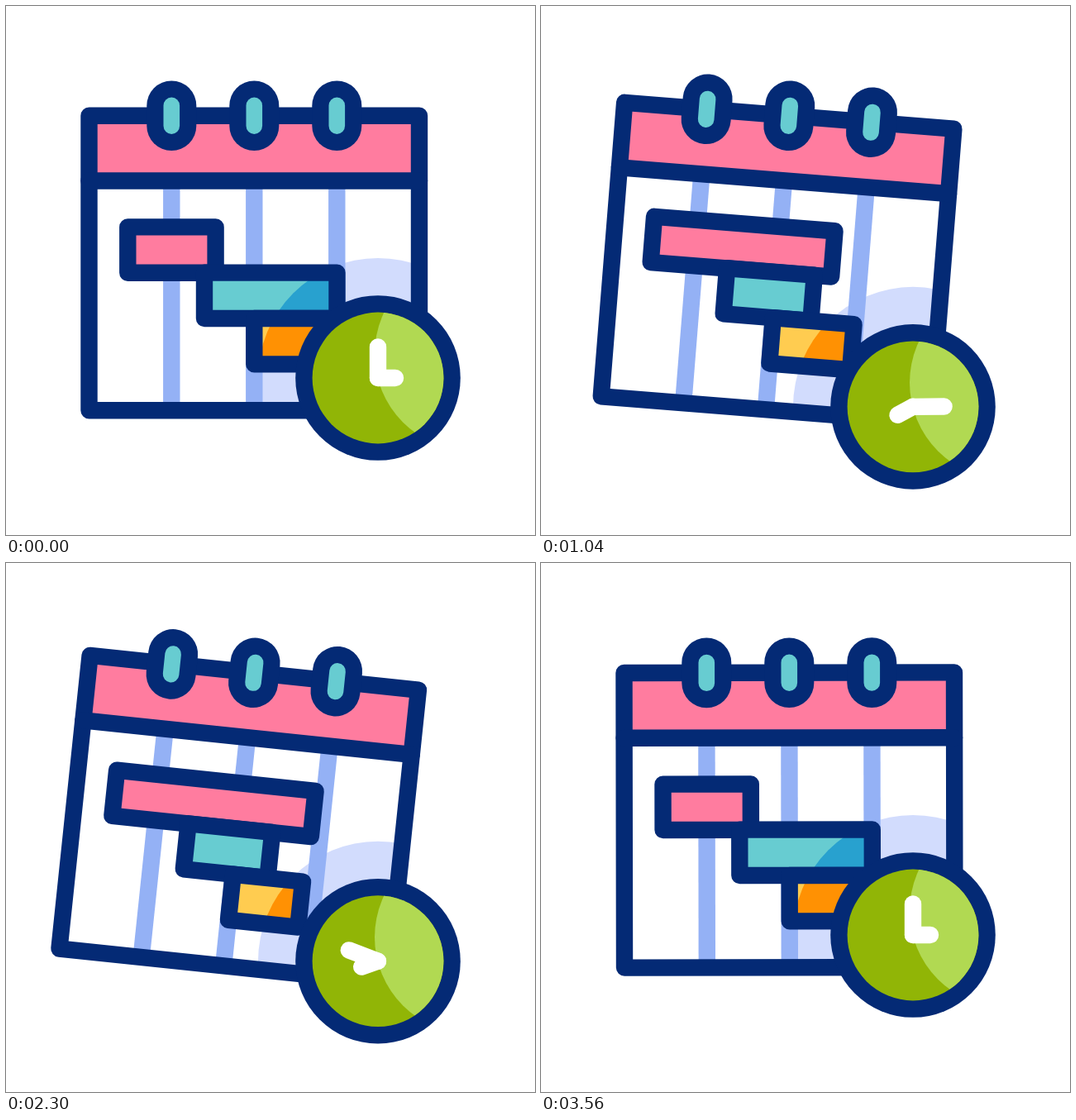
An HTML page with a canvas that plays this animation: 640x640 px, repeating every 3600 ms.

```html
<!DOCTYPE html>
<html lang="en">
<head>
<meta charset="utf-8">
<title>Project schedule</title>
<style>
html, body { margin: 0; width: 100%; height: 100%; overflow: hidden; background: #fff; }
canvas { display: block; width: 640px; height: 640px; }
</style>
</head>
<body>
<canvas id="stage" width="640" height="640"></canvas>
<script>
const ctx = document.getElementById('stage').getContext('2d');
const LOOP = 3600, LINE = 20.4;
const NAVY = '#042a75', PINK = '#ff7c9f', TEAL = '#67ccd1', BLUE = '#28a1cf',
  YELLOW = '#ffcc50', ORANGE = '#ff9103', COLUMN = '#94b1f5', HALO = '#d2dcfd',
  GREEN = '#91b506', LIME = '#b1d952';
const PIVOT = { x: 300, y: 133 };

const SWING_TIMES = [0, 600, 1200, 1800, 2400, 3000, 3600];
const SWING = [0, -7, 7, -7, 7, -7, 0];
const BOB_TIMES = [0, 850, 1700, 2550, 3520];
const BOB = [450, 490, 450, 490, 450];
const BAR_TIMES = [0, 680, 1360, 2040, 2720, 3520];

// Eased value between keyframes, held after the last one.
function tween(t, times, values) {
  const i = times.findIndex(k => t < k);
  if (i < 0) return values[values.length - 1];
  const p = (t - times[i - 1]) / (times[i] - times[i - 1]);
  return values[i - 1] + (values[i] - values[i - 1]) * p * p * (3 - 2 * p);
}

// Bars alternate between stretched and middle widths, then return to rest.
const barWidth = (t, rest, far, middle) =>
  tween(t, BAR_TIMES, [rest, far, middle, far, middle, rest]);

function stroke(points, color, width) {
  ctx.beginPath();
  points.forEach(([x, y]) => ctx.lineTo(x, y));
  ctx.strokeStyle = color;
  ctx.lineWidth = width;
  ctx.stroke();
}

function disc(x, y, r, color) {
  ctx.beginPath();
  ctx.arc(x, y, r, 0, 2 * Math.PI);
  ctx.fillStyle = color;
  ctx.fill();
}

function fillBox(x, y, w, h, color) {
  ctx.fillStyle = color;
  ctx.fillRect(x, y, w, h);
}

function outline(x, y, w, h) {
  ctx.strokeStyle = NAVY;
  ctx.lineWidth = LINE;
  ctx.strokeRect(x, y, w, h);
}

// The clock's halo, upright, seen only through a box on the calendar.
function haloIn(x, y, w, h, clockY, color) {
  ctx.save();
  ctx.beginPath();
  ctx.rect(x, y, w, h);
  ctx.clip();
  ctx.setTransform(1, 0, 0, 1, 0, 0);
  disc(450, clockY, 145, color);
  ctx.restore();
}

function bar(x, y, w, clockY, color, shade) {
  fillBox(x, y, w, 55.4, color);
  haloIn(x, y, w, 55.4, clockY, shade);
  outline(x, y, w, 55.4);
}

function drawCalendar(t, clockY) {
  ctx.save();
  ctx.translate(PIVOT.x, PIVOT.y);
  ctx.rotate(tween(t, SWING_TIMES, SWING) * Math.PI / 180);
  ctx.translate(-PIVOT.x, -PIVOT.y);

  haloIn(100.5, 211.5, 399.5, 277.5, clockY, HALO);
  for (const x of [200.3, 300.3, 400.3]) fillBox(x - 10.2, 211, 20.4, 278, COLUMN);
  fillBox(100.5, 133, 399.5, 78.5, PINK);
  outline(100.5, 132.7, 399.5, 356.6);
  stroke([[100.5, 211.5], [500, 211.5]], NAVY, LINE);

  for (const x of [200.3, 300.3, 400.3]) {
    const ring = [[x, 120.4], [x, 145.1]];
    stroke(ring, NAVY, 60);
    stroke(ring, TEAL, 19.6);
  }

  bar(147.3, 267.4, barWidth(t, 106.3, 276, 172), clockY, PINK, PINK);
  bar(240, 322.6, barWidth(t, 160.5, 96.5, 114), clockY, TEAL, BLUE);
  bar(300.3, 378, barWidth(t, 165, 64.5, 126), clockY, YELLOW, ORANGE);
  ctx.restore();
}

function drawHand(length, degrees) {
  const a = degrees * Math.PI / 180;
  stroke([[0, 0], [length * Math.sin(a), -length * Math.cos(a)]], '#fff', LINE);
}

function drawClock(t, y) {
  ctx.save();
  ctx.translate(450, y);
  disc(0, 0, 99.8, NAVY);
  disc(0, 0, 79.4, GREEN);
  ctx.save();
  ctx.beginPath();
  ctx.arc(0, 0, 79.4, 0, 2 * Math.PI);
  ctx.clip();
  disc(113, -29, 117, LIME);
  ctx.restore();
  drawHand(37.6, tween(t, [0, 3200], [0, 360]));
  drawHand(21, tween(t, [0, 3520], [90, 810]));
  ctx.restore();
}

function render(now) {
  const t = now % LOOP;
  const clockY = tween(t, BOB_TIMES, BOB);
  ctx.lineCap = ctx.lineJoin = 'round';
  fillBox(0, 0, 640, 640, '#fff');
  drawCalendar(t, clockY);
  drawClock(t, clockY);
}

const start = performance.now();
function frame() {
  render(performance.now() - start);
  requestAnimationFrame(frame);
}
frame();
</script>
</body>
</html>
```
